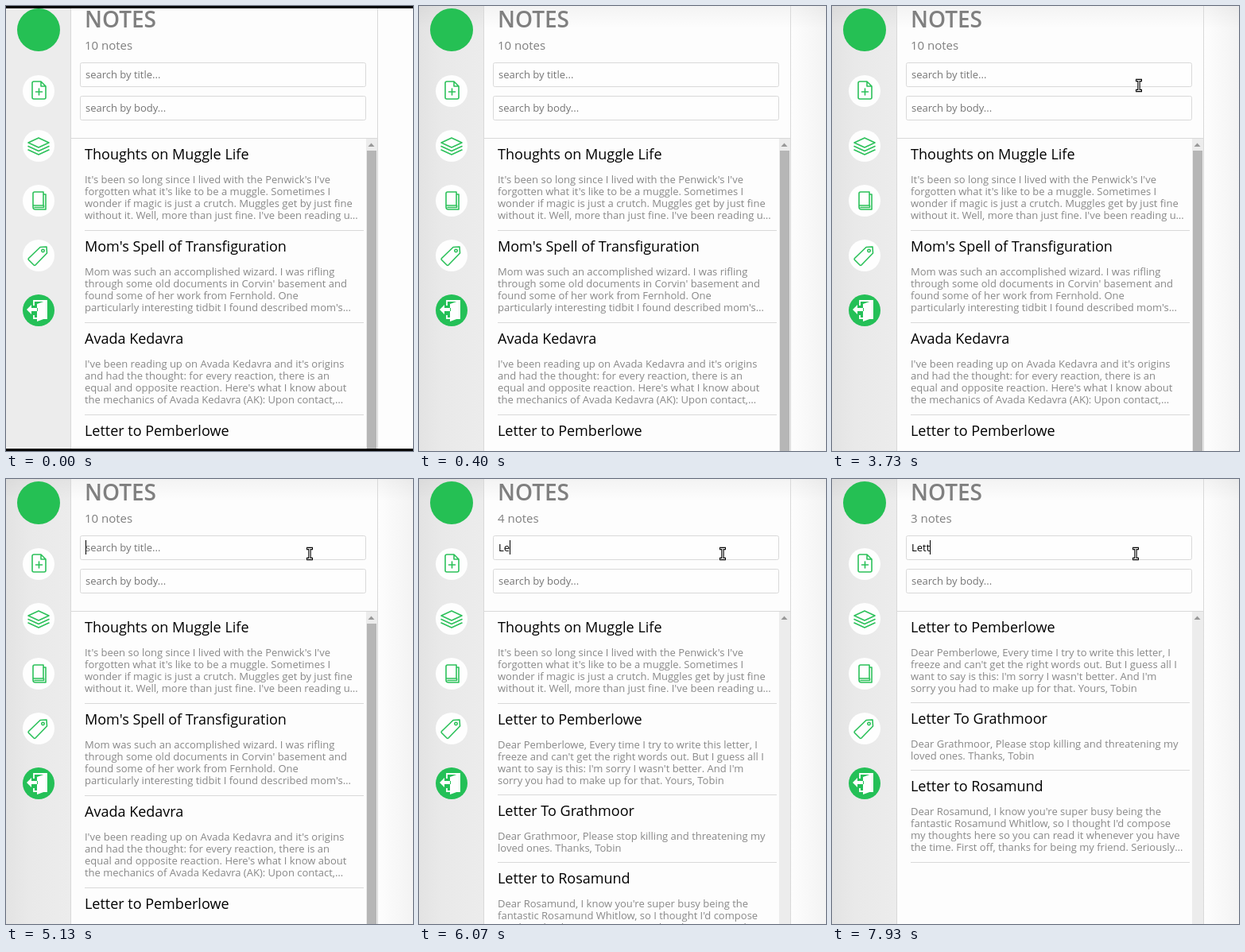
Write an HTML page that moves like this. It is 512x560 px and loops after 8 s.

```html
<!DOCTYPE html>
<html lang="en">
<head>
<meta charset="utf-8">
<title>Notes</title>
<style>
html, body { margin: 0; width: 512px; height: 560px; overflow: hidden; background: #fdfdfd; }
svg { display: block; font-family: "Open Sans", "Noto Sans", sans-serif; }
.line { stroke: #d9d9d9; fill: none; }
.field { fill: #fefefe; stroke: #d9d9d9; }
.heading { font-size: 28px; font-weight: 600; fill: #7f7f7f; }
.count { font-size: 15px; fill: #7f7f7f; }
.hint { font-size: 13px; fill: #757575; }
.typed { font-size: 13px; fill: #000; }
.title { font-size: 18px; fill: #000; }
.body { font-size: 13px; fill: #888; }
.icon { fill: none; stroke: #2cc15a; stroke-width: 1.6; stroke-linejoin: round; stroke-linecap: round; }
</style>
</head>
<body>
<svg width="512" height="560" viewBox="0 0 512 560">
  <defs>
    <linearGradient id="sideTint">
      <stop offset="0" stop-color="#e3e3e3"/>
      <stop offset=".35" stop-color="#e9e9e9"/>
      <stop offset="1" stop-color="#ececec"/>
    </linearGradient>
    <linearGradient id="edgeTint">
      <stop offset="0" stop-color="#fdfdfd"/>
      <stop offset="1" stop-color="#f3f3f3"/>
    </linearGradient>
    <linearGradient id="topTint" x2="0" y2="1">
      <stop offset="0" stop-opacity=".04"/>
      <stop offset="1" stop-opacity="0"/>
    </linearGradient>
    <clipPath id="view"><rect x="82" y="167" width="370" height="393"/></clipPath>
  </defs>

  <rect width="512" height="560" fill="#fdfdfd"/>
  <rect id="side" width="81" height="560" fill="url(#sideTint)"/>
  <g id="shade">
    <rect x="468" width="44" height="560" fill="url(#edgeTint)"/>
    <rect width="512" height="28" fill="url(#topTint)"/>
  </g>
  <path class="line" d="M81.5 0V560M467.5 0V560M82 166.5H467"/>

  <circle cx="41" cy="30" r="27" fill="#25c054"/>
  <g fill="#fefefe">
    <circle cx="41" cy="107" r="20"/>
    <circle cx="41" cy="176" r="20"/>
    <circle cx="41" cy="245" r="20"/>
    <circle cx="41" cy="314" r="20"/>
  </g>
  <g class="icon">
    <path d="M35 95H44L50 101V115Q50 117 48 117H35Q33 117 33 115V97Q33 95 35 95ZM44 95V101H50M41.5 104V112M37.5 108H45.5"/>
    <path d="M41 166L54 172L41 178L28 172ZM28 176.500L41 182.500L54 176.500M28 181L41 187L54 181"/>
    <path d="M36 234H47V251H34V236Q34 234 36 234ZM34 251V253Q34 256 37 256H50V237H47M36 253.500H47.500V251"/>
    <path d="M43 303.500L51 303L51.500 311L37 326Q36 327 35 326L28.500 319.500Q27.500 318.500 28.500 317.500Z"/>
    <circle cx="46.500" cy="308" r="1.700"/>
  </g>
  <circle cx="41" cy="383" r="20" fill="#24c057"/>
  <path d="M35 377V371H51V393H46M35 389V393H39" fill="none" stroke="#fefefe" stroke-width="1.800"/>
  <path d="M50 371L39 375V397L50 393ZM26 382L32 376V380H40V384H32V388Z" fill="#fefefe"/>

  <text class="heading" x="99" y="27">NOTES</text>
  <text class="count" id="count" x="99" y="55"></text>
  <rect class="field" x="93.500" y="71.500" width="359" height="30" rx="2"/>
  <rect class="field" x="93.500" y="113.500" width="359" height="30" rx="2"/>
  <text id="query" x="100" y="91"></text>
  <text class="hint" x="100" y="133">search by body...</text>
  <rect id="caret" y="77" width="1" height="18"/>

  <g id="list" clip-path="url(#view)"></g>

  <rect x="453" y="167" width="14" height="393" fill="#ececec"/>
  <path d="M455.500 177L459.500 172.500L463.500 177Z" fill="#989898"/>
  <rect id="thumb" x="454" y="182" width="12" height="378" fill="#b6b6b6"/>

  <path id="arrow" d="M0 0V16.500L4 13L6.500 19L9.500 17.800L7 12H12Z" fill="#fff" stroke="#000" stroke-width="1.300"/>
  <g id="beam" fill="none">
    <path d="M-4 -6.500H4M-4 6.500H4M0 -6.500V6.500" stroke="#000" stroke-width="3.400"/>
    <path d="M-3 -6.500H3M-3 6.500H3M0 -6.500V6.500" stroke="#fff" stroke-width="1.200"/>
  </g>

  <rect id="top" width="512"/>
  <rect id="bottom" width="512"/>
</svg>
<script>
const $ = id => document.getElementById(id);
const show = (id, on) => $(id).setAttribute("visibility", on ? "visible" : "hidden");
const set = (id, attrs) => { for (const k in attrs) $(id).setAttribute(k, attrs[k]); };

const notes = {
  life: ["Thoughts on Muggle Life",
    "It's been so long since I lived with the Penwick's I've",
    "forgotten what it's like to be a muggle. Sometimes I",
    "wonder if magic is just a crutch. Muggles get by just fine",
    "without it. Well, more than just fine. I've been reading u…"],
  spell: ["Mom's Spell of Transfiguration",
    "Mom was such an accomplished wizard. I was rifling",
    "through some old documents in Corvin' basement and",
    "found some of her work from Fernhold. One",
    "particularly interesting tidbit I found described mom's…"],
  curse: ["Avada Kedavra",
    "I've been reading up on Avada Kedavra and it's origins",
    "and had the thought: for every reaction, there is an",
    "equal and opposite reaction. Here's what I know about",
    "the mechanics of Avada Kedavra (AK): Upon contact,…"],
  mentor: ["Letter to Pemberlowe",
    "Dear Pemberlowe, Every time I try to write this letter, I",
    "freeze and can't get the right words out. But I guess all I",
    "want to say is this: I'm sorry I wasn't better. And I'm",
    "sorry you had to make up for that. Yours, Tobin"],
  rival: ["Letter To Grathmoor",
    "Dear Grathmoor, Please stop killing and threatening my",
    "loved ones. Thanks, Tobin"],
  friend: ["Letter to Rosamund",
    "Dear Rosamund, I know you're super busy being the",
    "fantastic Rosamund Whitlow, so I thought I'd compose",
    "my thoughts here so you can read it whenever you have",
    "the time. First off, thanks for being my friend. Seriously…"]
};

// start time, typed text, result count, visible notes
const letters = ["mentor", "rival", "friend"];
const states = [
  [0, "", 10, ["life", "spell", "curse", "mentor"]],
  [5670, "L", 6, ["life", "spell", "mentor", "rival"]],
  [6070, "Le", 4, ["life", ...letters]],
  [6400, "Let", 3, letters],
  [6730, "Lett", 3, letters]
];

function listMarkup(keys) {
  let y = 166, out = "";
  for (const key of keys) {
    const [title, ...lines] = notes[key];
    out += `<text class="title" x="99" y="${y + 27}">${title}</text>`;
    lines.forEach((s, i) => out += `<text class="body" x="99" y="${y + 57 + 15 * i}">${s}</text>`);
    y += 55 + 15 * lines.length + (lines.at(-1).endsWith("…") ? 1 : 0);
    out += `<path class="line" d="M99 ${y + .5}H450"/>`;
  }
  return out;
}

let current;
function applyState(state) {
  if (state === current) return;
  current = state;
  const [, typed, count, keys] = state;
  $("count").textContent = count + " notes";
  $("query").textContent = typed || "search by title...";
  $("query").setAttribute("class", typed ? "typed" : "hint");
  $("list").innerHTML = listMarkup(keys);
  show("thumb", count > 4);
}

const mix = (a, b, p) => a + (b - a) * p;
const stepped = (t, from, to, n) => Math.min(1, Math.max(0, Math.floor((t - from) / (to - from) * n + .01) / n));

function drawPointer(t) {
  const p = stepped(t, 2870, 3670, 12), q = stepped(t, 3670, 3930, 4);
  const ease = p * p * (3 - 2 * p);
  const x = mix(mix(501, 386, ease), 382, q);
  const y = mix(mix(89, 100, ease), 94, q);
  const seen = t >= 2870, inside = x < 453;
  show("arrow", seen && !inside);
  show("beam", seen && inside);
  set("arrow", { transform: `translate(${x + .5} ${y})` });
  set("beam", { transform: `translate(${x} ${y})` });
}

function drawCaret(t) {
  const typed = current[1];
  const since = t - (typed ? current[0] : 3930);
  show("caret", since >= 0 && Math.floor(since / 600) % 2 === 0);
  const x = typed ? 100 + $("query").getComputedTextLength() : 100;
  set("caret", { x: Math.round(x) });
}

function drawBackdrop(t) {
  const early = t < 200;
  const h = early ? 3 : Math.max(0, 2 - Math.floor((t - 200) / 66));
  set("top", { height: h });
  set("bottom", { y: 560 - h, height: h });
  set("side", { fill: early ? "#ececec" : "url(#sideTint)" });
  show("shade", !early);
}

const start = performance.now();
function frame() {
  const t = (performance.now() - start) % 8000;
  applyState(states.findLast(s => t >= s[0]));
  drawPointer(t);
  drawCaret(t);
  drawBackdrop(t);
  requestAnimationFrame(frame);
}
frame();
</script>
</body>
</html>
```
